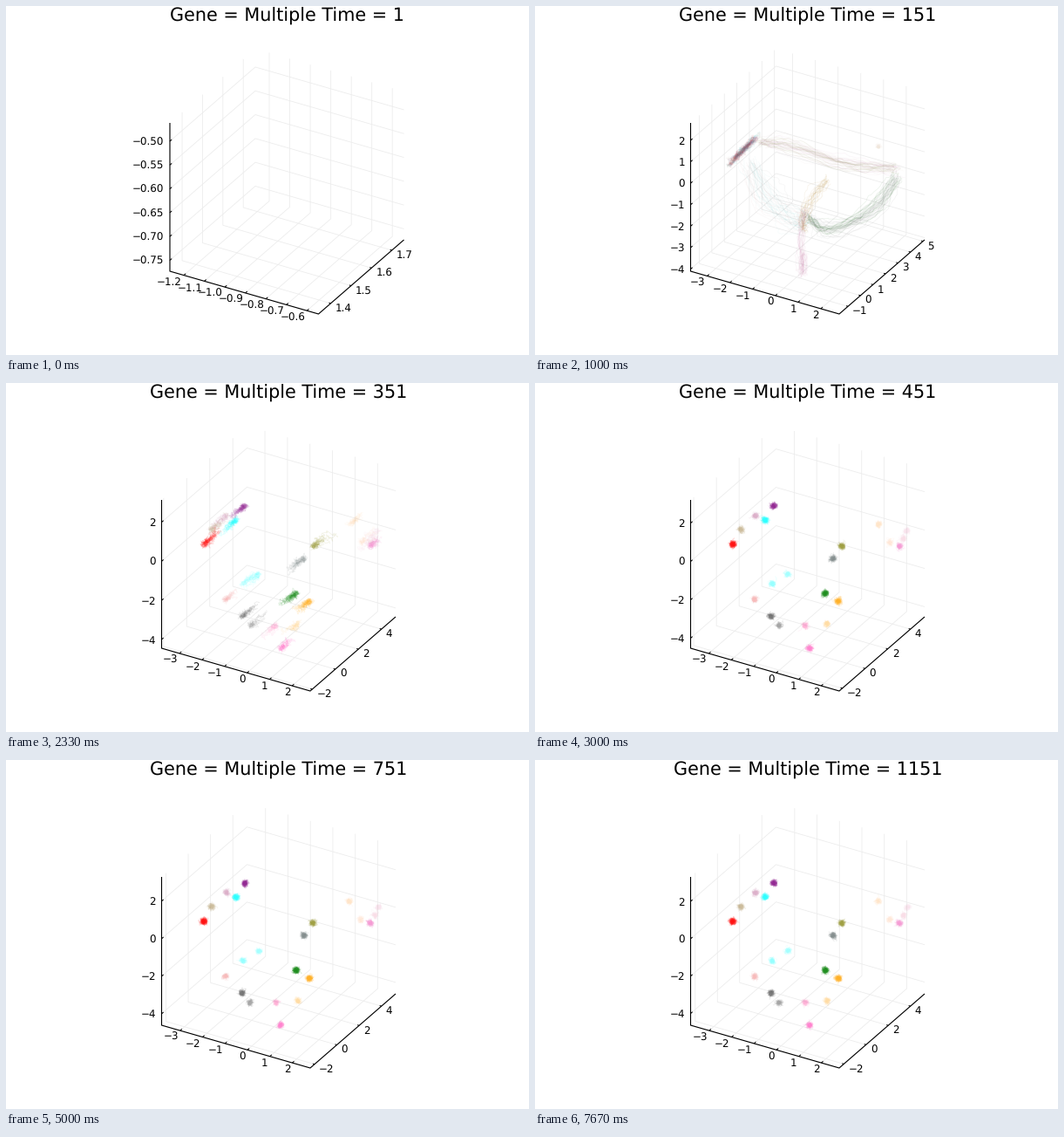
Animation of 600 by 400 pixels, one loop 8000 ms. Source, as a matplotlib script:

```python
import numpy as np
import matplotlib.pyplot as plt
from matplotlib.animation import FuncAnimation
from matplotlib.collections import LineCollection
from matplotlib.colors import to_rgb

W, H, DPI = 600, 400, 100
LOOP_MS, INTERVAL, PLOTS = 8000, 50, 24
PX = 72 / DPI
SAMPLE, WINDOW = 2, 100

plt.rcParams.update({"font.family": "DejaVu Sans", "text.hinting": "none"})
fig = plt.figure(figsize=(W / DPI, H / DPI), dpi=DPI, facecolor="white")
ax = fig.add_axes([0, 0, 1, 1])

# Edge vectors of the projected box, in pixels.
EX, EY, EZ = np.array([170.5, 49]), np.array([98, -85]), np.array([0, -170])

# Settled axis limits, and how far they still are from them at time 151.
LIMITS = {"x": (-3.83, 2.80), "y": (-2.42, 5.28), "z": (-4.63, 3.31)}
LIMITS_GAP = {"x": (.10, .01), "y": (.72, -.15), "z": (.53, -.50)}
FIRST_LIMITS = {"x": (-1.268, -.5436), "y": (1.34, 1.759), "z": (-.773, -.4616)}

# Early routes, by their positions at ROUTE_TIMES.
START = (299, 199)
ROUTE_TIMES = [45, 85, 115, 150]
ROUTES = {
    "streak": [(238, 166)] * 4,
    "spot": [(394, 161)] * 4,
    "arc": [(250, 155), (290, 158), (355, 183), (421, 187)],
    "low": [(422, 186), (390, 236), (335, 262), (312, 240)],
    "arm": [(338, 196), (322, 213), (309, 236), (307, 258)],
    "column": [(310, 228), (304, 265), (308, 315), (308, 280)],
    "mess": [(242, 172), (264, 225), (300, 245), (310, 250)],
}
SCATTER = {"streak": 2, "spot": 1, "mess": 11, "low": 6, "arc": 6}
DIAGONAL = np.array([.78, -.62])

# Resting places by route: x, y, colour, strength.
FATES = {
    "streak": [(227, 185, "red", 1), (236, 168, "#a08040", .35), (253, 152, "#b04080", .25),
               (274, 141, "purple", .8), (264, 157, "cyan", .75)],
    "spot": [(394, 162, "#ffa030", .1)],
    "arc": [(352, 187, "olive", .65), (407, 183, "#ff9040", .05), (418, 187, "#f040b0", .35),
            (423, 178, "#e05080", .03), (427, 169, "#e070a0", .03)],
    "low": [(342, 201, "#405050", .5), (333, 241, "green", .9), (271, 267, "black", .4)],
    "arm": [(348, 250, "orange", .8), (335, 276, "orange", .2)],
    "column": [(310, 278, "#ff40a0", .25), (315, 304, "#ff30b0", .45)],
    "mess": [(272, 230, "cyan", .25), (290, 219, "cyan", .2), (252, 248, "#ee4444", .2),
             (280, 278, "black", .2)],
}

times = np.arange(1, 50 * PLOTS, SAMPLE)


def smooth(values, width):
    padded = np.pad(values, width // 2, mode="edge")
    return np.convolve(padded, np.ones(width) / width, mode="valid")


def walk(rng, route, home):
    early = np.array(ROUTES[route], float)
    early += rng.normal(0, SCATTER.get(route, 4), (4, 2)) * [[.6], [1], [1], [.6]]
    if route == "streak":
        early += np.outer(rng.uniform(-27, 27, 4), (.71, -.71))
    # Every home is approached along the diagonal, from the side of the route's end.
    side = np.sign(np.dot(np.subtract(ROUTES[route][-1], home), DIAGONAL))
    approach = home + side * rng.uniform(4, 24) * DIAGONAL + rng.normal(0, 2, 2)
    arrival = rng.uniform(285, 385)
    points = np.vstack([START, early, approach, home])
    keys = [1, *ROUTE_TIMES, arrival - 95, arrival]
    shake = np.interp(times, [1, 150, 350], [.8, 1.2, 1.8])
    return np.column_stack([
        smooth(np.interp(times, keys, points[:, k]), 13)
        + smooth(rng.normal(0, 1.73, len(times)), 3) * shake
        for k in range(2)])


def make_walkers(rng):
    walkers = [
        (walk(rng, route, np.array([x, y])), np.array(to_rgb(color)), .03 + .10 * strength)
        for route, fates in FATES.items()
        for x, y, color, strength in fates
        for _ in range(int(6 + 12 * strength))]
    return [walkers[i] for i in rng.permutation(len(walkers))]


walkers = make_walkers(np.random.default_rng(7))


def limits_at(time):
    if time == 1:
        return FIRST_LIMITS
    gap = np.exp((151 - time) / 185)
    return {a: np.add(LIMITS[a], np.multiply(LIMITS_GAP[a], gap)) for a in "xyz"}


def ticks_at(time, axis, lo, hi):
    """Yield (fraction along the axis, label)."""
    if time == 1:
        step, digits = (.05, 2) if axis == "z" else (.1, 1)
    else:
        step, digits = (1 if axis == "x" or time <= 151 else 2), 0
    for n in range(int(np.ceil(lo / step)), int(np.floor(hi / step)) + 1):
        yield (n * step - lo) / (hi - lo), f"{n * step:.{digits}f}".replace("-", "−")


def polyline(*points, width=1.0, color="black", z=3):
    xs, ys = zip(*points)
    ax.plot(xs, ys, color=color, lw=width * PX, zorder=z, solid_capstyle="butt")


def label(pos, text, align, size=11.9):
    ax.text(*pos, text, fontsize=size * PX, ha=align, va="baseline", color="black", zorder=4)


def draw_box(time):
    origin = np.array([188 if time == 1 else 178.5, 304])
    # Per axis: two edges its grid lines follow, tick base and direction, label offset.
    layout = {
        "x": (EX, EY, EZ, 0 * EX, EY * .022, (-2, 11.2), "right"),
        "y": (EY, EX, EZ, EX, EX * -.012, (5, 9.2), "left"),
        "z": (EZ, EY, EX, 0 * EX, EY * .022, (-6.5, 4.6), "right"),
    }
    limits = limits_at(time)
    for axis, (along, edge1, edge2, base, tick, offset, align) in layout.items():
        for f, text in ticks_at(time, axis, *limits[axis]):
            p = origin + f * along
            bend = p + edge1 if axis != "y" else p
            start = p if axis != "y" else p + edge1
            polyline(start, bend, bend + edge2, color="#ececec", width=.8, z=1)
            polyline(p + base, p + base + tick)
            label(p + base + offset, text, align)
    polyline(origin + EZ, origin, origin + EX, origin + EX + EY, width=1.15)
    label((origin[0] + 134.5, 18), f"Gene = Multiple Time = {time}", "center", 20.8)


def draw_trails(time):
    shown = (times <= time) & (times >= time - WINDOW)
    if shown.sum() < 2:
        return
    # Crowded early trails read as thin grey; colours come out as walkers settle.
    tint = np.interp(time, [100, 300], [.4, 1])
    fade = np.interp(time, [100, 300], [.6, 1])
    ax.add_collection(LineCollection(
        [path[shown] for path, _, _ in walkers],
        colors=[(*(.42 + tint * (rgb - .42)), alpha * fade) for _, rgb, alpha in walkers],
        linewidths=.85 * PX, zorder=2))


def draw(frame):
    # A new plot about every third of a second, on the nearest frame boundary.
    plot = int((frame * INTERVAL + 35) * PLOTS / LOOP_MS)
    time = 1 + 50 * plot
    ax.clear()
    ax.set(xlim=(0, W), ylim=(H, 0))
    ax.axis("off")
    draw_box(time)
    draw_trails(time)
    return []


anim = FuncAnimation(fig, draw, frames=LOOP_MS // INTERVAL, interval=INTERVAL,
                     repeat=True, repeat_delay=0, init_func=lambda: draw(0))
plt.show()
```
